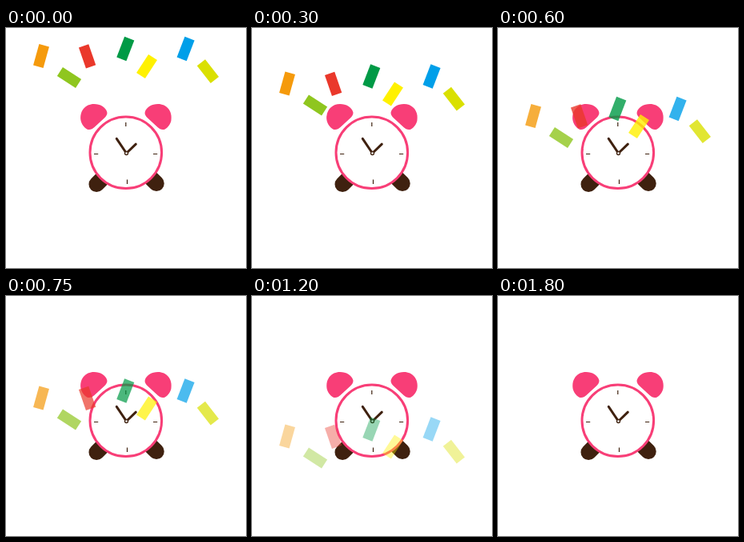
Animation of 300 by 300 pixels, one loop 1950 ms. Source, as an HTML page:

```html
<!DOCTYPE html>
<html lang="en">
<head>
<meta charset="utf-8">
<title>Alarm clock confetti</title>
<style>
  html, body { margin: 0; width: 100%; height: 100%; overflow: hidden; background: #fff; }
  svg { display: block; width: 100%; height: 100%; }
</style>
</head>
<body>
<svg viewBox="0 0 300 300">
  <defs>
    <path id="bell" fill="#f83e77" d="M93.6 116C91.5 104 99 95 110 95C118 95 124.500 99 126.300 105C127 107.500 125.500 110 123 112.500L110.500 124C106.500 128 102 128 98.500 124.500C96 122 94.300 119 93.600 116Z"/>
  </defs>
  <use href="#bell"/>
  <use href="#bell" transform="translate(300 0) scale(-1 1)"/>
  <g stroke="#3f210f" stroke-linecap="round" fill="none">
    <path stroke-width="19.500" d="M113.200 195.300L126 182.500M188 194.300L175 181.500"/>
    <circle cx="149.800" cy="155.800" r="44.800" fill="#fff" stroke="#f83e77" stroke-width="3"/>
    <path stroke-width="1.200" stroke-linecap="butt" d="M149.800 118v5M151.500 189.500v5.500M110 157.500h5.200M184 157.500h5.200"/>
    <path stroke-width="3" d="M138.300 138.300L150.500 156.500L162.300 145.200"/>
    <circle cx="150.500" cy="156.500" r="2" fill="#fff" stroke-width="1.300"/>
  </g>
  <g id="confetti"></g>
</svg>
<script>
  const STEP = 150, LOOP = 1950, FADE_END = 1800, FADE_TIME = 1500;
  // x, y, angle, colour
  const PIECES = [
    [44, 35, 15.5, '#f59a0c'],
    [79, 62, -57, '#8fc61f'],
    [101.6, 35.4, -19, '#ea382b'],
    [149.3, 26, 21, '#009a46'],
    [176, 48, 33, '#fff100'],
    [224.6, 26, 21, '#009fe9'],
    [252.4, 54.2, -38, '#dae000']
  ];
  // Fall distance after each step
  const FALL = [0, 16, 34.5, 55, 75, 92.5, 110, 125.5, 140.5, 154, 167, 178, 189];

  const confetti = document.getElementById('confetti');
  for (const [x, y, angle, color] of PIECES) {
    const rect = document.createElementNS('http://www.w3.org/2000/svg', 'rect');
    const attrs = {
      x: -6.5, y: -13.8, width: 13, height: 27.6, fill: color,
      transform: `translate(${x} ${y}) rotate(${angle})`
    };
    for (const key in attrs) rect.setAttribute(key, attrs[key]);
    confetti.append(rect);
  }

  function draw(time) {
    const step = Math.floor((time % LOOP) / STEP);
    const opacity = Math.min(1, (FADE_END - step * STEP) / FADE_TIME);
    confetti.setAttribute('transform', `translate(0 ${FALL[step]})`);
    confetti.setAttribute('opacity', opacity);
  }

  const start = performance.now();
  function tick() {
    draw(performance.now() - start);
    requestAnimationFrame(tick);
  }
  tick();
</script>
</body>
</html>
```
